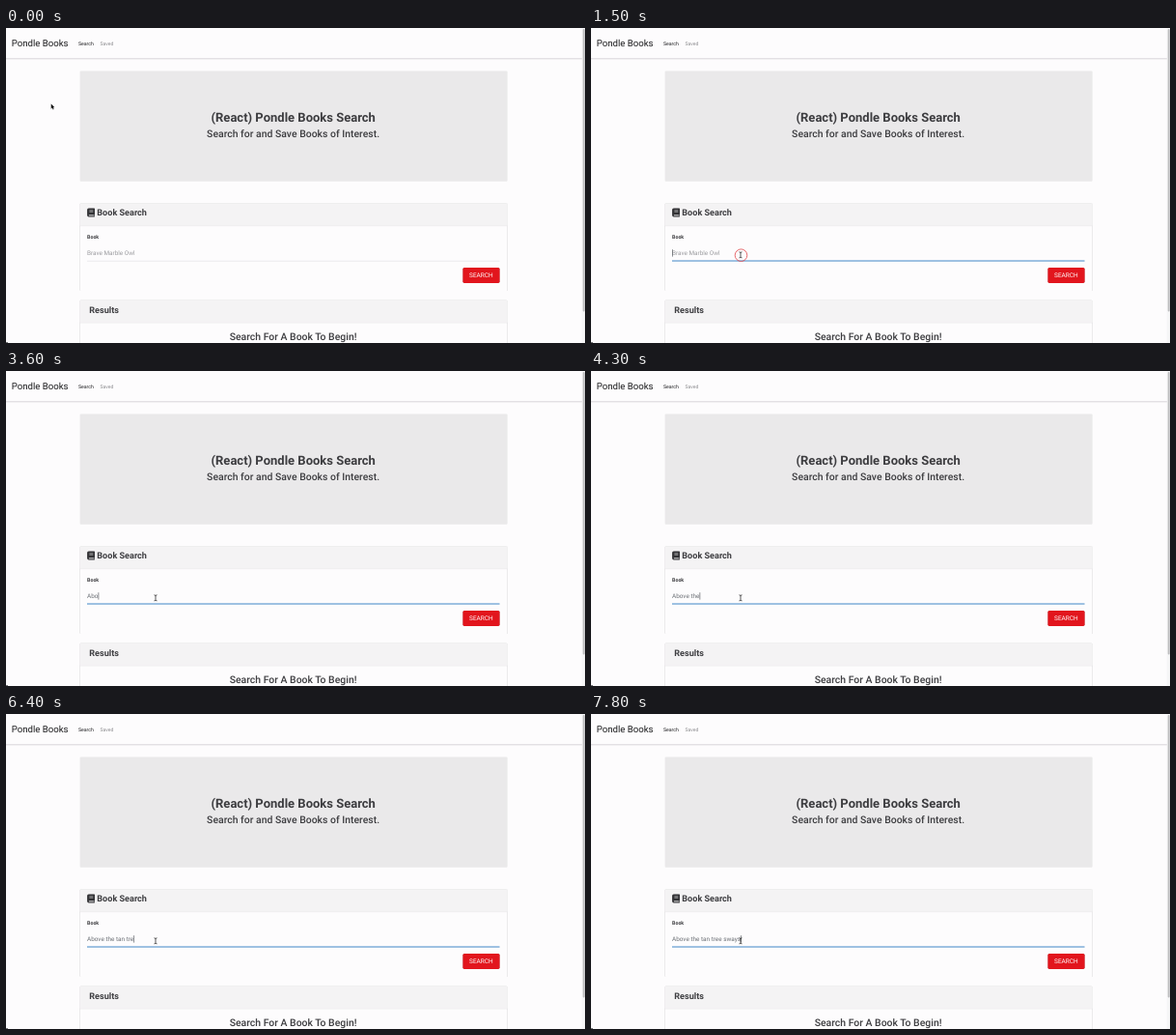
These frames come from a looping animation (600 px wide and 326 px high, 8000 ms). An HTML page:

```html
<!DOCTYPE html>
<html lang="en">
<head>
<meta charset="utf-8">
<title>Book Search</title>
<style>
  html, body { margin: 0; width: 100%; height: 100%; overflow: hidden; background: #fdfcfd; }
  svg { display: block; width: 600px; height: 326px; }
  text { font-family: Roboto, sans-serif; fill: #3d3d40; white-space: pre; text-rendering: geometricPrecision; }
  .mid { text-anchor: middle; }
  .head { font-size: 9.1px; font-weight: 600; }
  .sub { font-size: 10.45px; font-weight: 500; }
  .nav { font-size: 5.15px; }
  .field { font-size: 6.4px; }
  .card { filter: drop-shadow(0 .8px .7px rgba(0,0,0,.3)); }
</style>
</head>
<body>
<svg viewBox="0 0 600 326">
  <defs>
    <g id="card">
      <rect class="card" width="443" height="90.4" rx="1" fill="#fdfcfd"/>
      <rect width="443" height="23.4" rx="1" fill="#f4f3f4"/>
      <rect y="23.2" width="443" height=".4" fill="#e4e3e5"/>
    </g>
  </defs>
  <rect width="600" height="326" fill="#fdfcfd"/>

  <!-- navigation -->
  <rect y="31.4" width="597" height=".8" fill="#d3cfd4"/>
  <rect y="32.2" width="597" height=".8" fill="#f0eff1"/>
  <text x="5.7" y="19.3" font-size="9.65" style="fill:#1c1c1e">Pondle Books</text>
  <text class="nav" x="75" y="17.5" style="fill:#1c1c1e">Search</text>
  <text class="nav" x="97.5" y="17.5" style="fill:#8b8b8e">Saved</text>

  <!-- banner -->
  <rect x="76.6" y="44.5" width="443" height="114.2" rx="1" fill="#eae9ea"/>
  <text class="mid" x="297.7" y="96.6" font-size="13" font-weight="700">(React) Pondle Books Search</text>
  <text class="sub mid" x="297.6" y="113">Search for and Save Books of Interest.</text>

  <!-- search card -->
  <use href="#card" x="76.6" y="181.5"/>
  <path d="M85.7 186.4H91.4Q92 186.4 92 187V192.8Q92 193.2 91.7 193.4V194.6Q92 194.8 92 195Q92 195.4 91.5 195.4H85.8Q84.1 195.4 84.1 193.7V188.1Q84.1 186.4 85.7 186.4Z" fill="#333336"/>
  <path d="M86.4 188.9H90.3M86.4 190.2H90.3" stroke="#f4f4f5" stroke-width=".5"/>
  <path d="M85.9 193.9H90.9" stroke="#f4f4f5" stroke-width=".9"/>
  <text class="head" x="94.3" y="194.3">Book Search</text>
  <text x="84" y="218.2" font-size="5.3" font-weight="700">Book</text>
  <text id="hint" class="field" x="84" y="234.9" style="fill:#9c9ca0">Brave Marble Owl</text>
  <text id="typed" class="field" x="84" y="234.9" style="fill:#6c7076"></text>
  <rect id="caret" y="229.2" width=".6" height="7.4" fill="#44484e"/>
  <rect x="84" y="240.9" width="427.5" height=".4" fill="#cfcfd3"/>
  <rect id="focus" x="84" y="240.5" width="427.5" height="1" fill="#4a8fd0"/>
  <rect class="card" x="473.4" y="247.9" width="38.2" height="16" rx="1.6" fill="#e2151d"/>
  <text class="mid" x="492.4" y="258.2" font-size="6.5" style="fill:#fff">SEARCH</text>

  <!-- results card -->
  <use href="#card" x="76.6" y="281.7"/>
  <text class="head" x="86.3" y="294.8">Results</text>
  <text class="sub mid" x="297.6" y="322.8">Search For A Book To Begin!</text>

  <!-- scrollbar -->
  <rect x="596.8" width="3.2" height="326" fill="#f6f6f7"/>
  <rect x="597.7" y="1" width="2" height="292.5" rx="1" fill="#bfbfc1"/>
  <rect y="325" width="2" height="1" fill="#77777a"/>

  <!-- pointer -->
  <circle id="ring" cx="155.5" cy="235.2" r="6.3" fill="none" stroke="#e2484c" stroke-width=".8"/>
  <path id="arrow" d="M0 0V5.2L1.2 4.1L2 6L2.9 5.6L2.1 3.8H3.7Z" fill="#111" stroke="#fff" stroke-width=".4" paint-order="stroke"/>
  <path id="beam" d="M-1.5 -3Q0 -3 0 -2.2Q0 -3 1.5 -3M0 -2.4V2.4M-1.5 3Q0 3 0 2.2Q0 3 1.5 3" fill="none" stroke="#222" stroke-width=".75"/>
</svg>
<script>
const LOOP = 8000, STEP = 100, CLICK = 1300;
// Each burst is typed at an even pace, first letter at "from", last at "to".
const BURSTS = [
  { text: "Above ", from: 3100, to: 4100 },
  { text: "the", from: 4200, to: 4300 },
  { text: " tan ", from: 4800, to: 5200 },
  { text: "tre", from: 6100, to: 6400 },
  { text: "e sways", from: 6700, to: 7800 },
];
const START = [46.7, 78.5], BEND = [62, -3], BELOW = [157.8, 242.4], FIELD = [155, 234.8];

const $ = id => document.getElementById(id);
const [hint, typed, caret, focus, ring, arrow, beam] =
  ["hint", "typed", "caret", "focus", "ring", "arrow", "beam"].map($);
const show = (el, on) => el.setAttribute("visibility", on ? "visible" : "hidden");
const progress = (t, a, b) => Math.min(1, Math.max(0, (t - a) / (b - a)));
const ease = k => k * k * (3 - 2 * k);
const mix = (a, b, k) => a.map((v, i) => v + (b[i] - v) * k);

// A curved sweep down to the field, then a short move up into it.
function pointer(t) {
  const k = ease(progress(t, 100, 800));
  const sweep = mix(mix(START, BEND, k), mix(BEND, BELOW, k), k);
  return mix(sweep, FIELD, progress(t, 900, 1100));
}

function lettersTyped({ text, from, to }, t) {
  if (t < from) return "";
  const gaps = text.length - 1;
  return text.slice(0, 1 + Math.floor(gaps * progress(t, from, to) + 1e-6));
}

// The caret stays lit while typing and blinks once a second when idle.
function caretOn(t) {
  const burst = BURSTS.filter(b => t >= b.from).pop();
  const rest = burst ? burst.to : CLICK + 50;
  return t >= CLICK && (t < rest || (t - rest) % 1000 < 550);
}

function draw(ms) {
  const t = Math.floor((ms % LOOP) / STEP) * STEP;
  const text = BURSTS.map(b => lettersTyped(b, t)).join("");
  if (typed.textContent !== text) typed.textContent = text;
  show(hint, !text);
  show(focus, t >= CLICK);
  show(caret, caretOn(t));
  caret.setAttribute("x", 84.2 + (text ? typed.getComputedTextLength() : 0));

  const overField = t >= 1000;
  show(arrow, !overField);
  show(beam, overField);
  (overField ? beam : arrow).setAttribute("transform", `translate(${pointer(t)})`);
  show(ring, t >= CLICK && t < CLICK + 300);
}

const start = performance.now();
function tick() {
  draw(performance.now() - start);
  requestAnimationFrame(tick);
}
tick();
</script>
</body>
</html>
```
